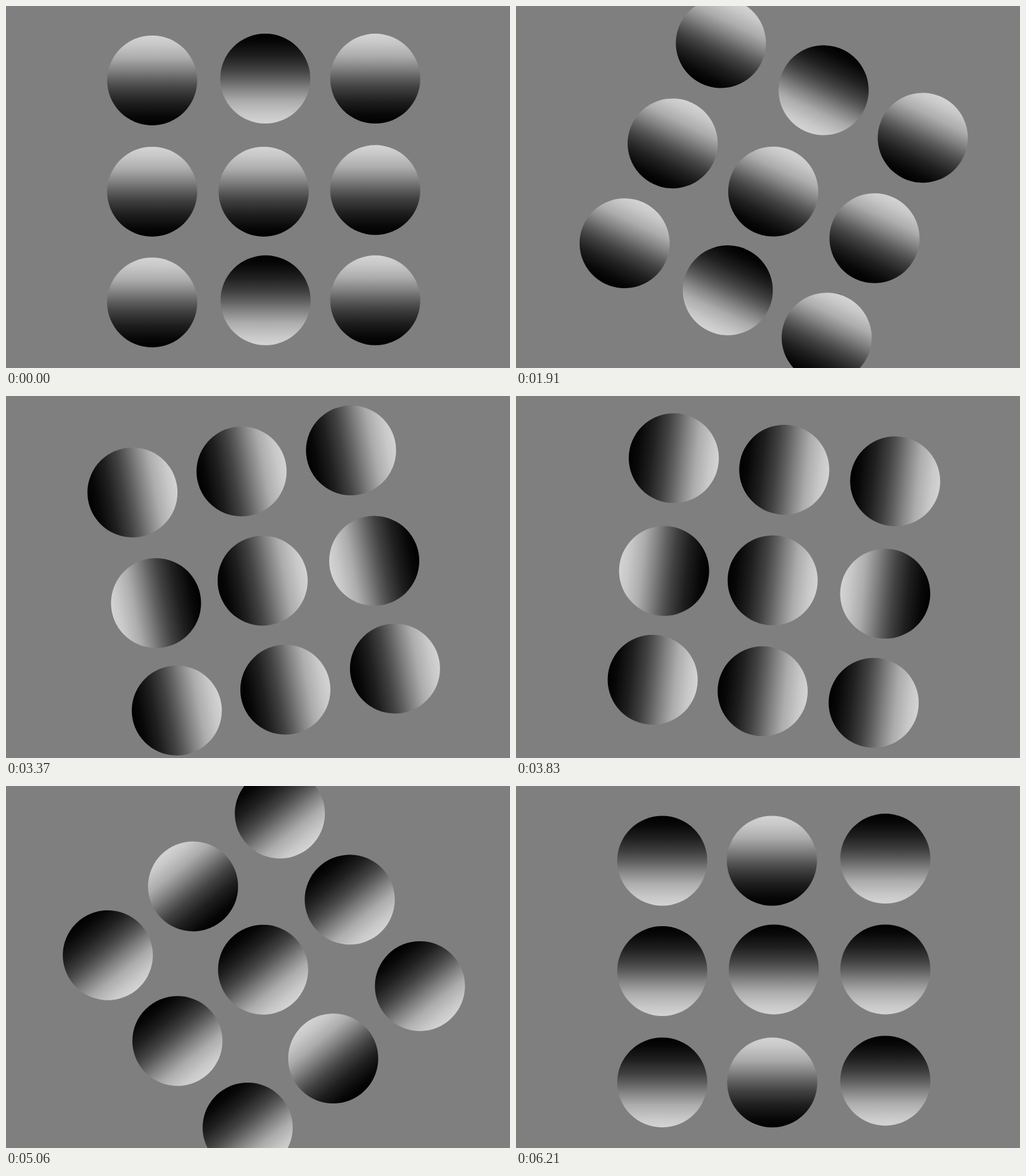
Animation, 800 px wide and 576 px high, one loop 9.29 s. Source, as an HTML page with a canvas:

```html
<!DOCTYPE html>
<html lang="en">
<head>
<meta charset="utf-8">
<title>Shaded discs</title>
<style>
  html, body { margin: 0; width: 100%; height: 100%; overflow: hidden; background: #7f7f7f; }
  canvas { display: block; }
</style>
</head>
<body>
<canvas id="stage" width="800" height="576"></canvas>
<script>
const ctx = document.getElementById('stage').getContext('2d');
const LOOP = 9290;
const START = 1210;
const RADIUS = 71.5;
const PIVOT = { x: 409.1, y: 293.65 };

// Centre of each disc before the turn; flipped discs are dark on top.
const discs = [
  [232, 118.4], [411.5, 115.5, true], [586.1, 115.6],
  [232, 295.4], [409, 295.4], [586.1, 292.8],
  [232, 471.7], [412, 468.3, true], [586.1, 468.3]
].map(([x, y, flipped]) => ({ x: x - PIVOT.x, y: y - PIVOT.y, flipped }));

// Grey level along the shading, from the light end to the dark end.
const shades = [
  [0, 212], [0.1, 200], [0.25, 172], [0.4, 126], [0.5, 93],
  [0.6, 64], [0.75, 31], [0.9, 8], [1, 0]
];

function shading(flipped) {
  const from = flipped ? RADIUS : -RADIUS;
  const gradient = ctx.createLinearGradient(0, from, 0, -from);
  for (const [pos, v] of shades) gradient.addColorStop(pos, `rgb(${v},${v},${v})`);
  return gradient;
}

const lightTop = shading(false);
const darkTop = shading(true);

// Half a turn at constant speed, shown at 13 steps per second.
function angleAt(t) {
  if (t < START) return 0;
  const step = Math.max(1, Math.floor((t - 1136) * 13 / 1000));
  return Math.min(180, 0.3 + 2.814 * (step - 1));
}

function draw(t) {
  ctx.fillStyle = '#7f7f7f';
  ctx.fillRect(0, 0, 800, 576);
  ctx.save();
  ctx.translate(PIVOT.x, PIVOT.y);
  ctx.rotate(angleAt(t) * Math.PI / 180);
  for (const disc of discs) {
    ctx.save();
    ctx.translate(disc.x, disc.y);
    ctx.fillStyle = disc.flipped ? darkTop : lightTop;
    ctx.beginPath();
    ctx.arc(0, 0, RADIUS, 0, Math.PI * 2);
    ctx.fill();
    ctx.restore();
  }
  ctx.restore();
}

const origin = performance.now();

function tick() {
  draw((performance.now() - origin) % LOOP);
  requestAnimationFrame(tick);
}

tick();
</script>
</body>
</html>
```
